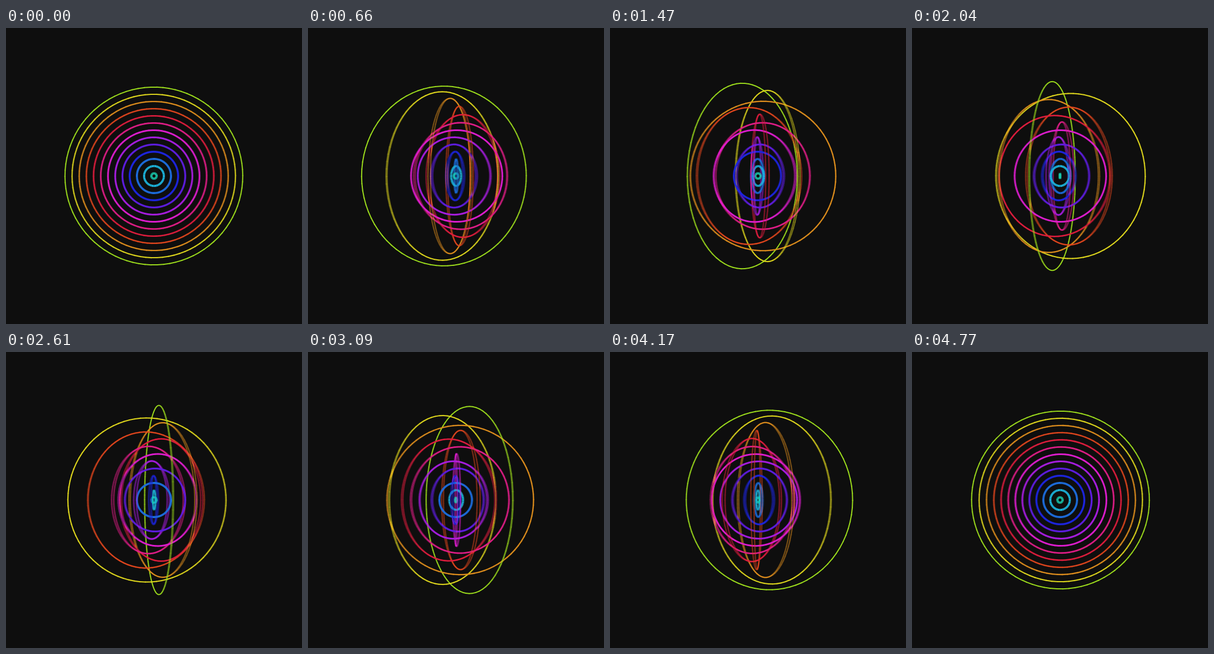
Animation of 540 by 540 pixels, one loop 4.8 s. Source, as an HTML page with a canvas:

```html
<!DOCTYPE html>
<html lang="en">
<head>
<meta charset="utf-8">
<title>Turning rings</title>
<style>
  html, body { margin: 0; width: 100%; height: 100%; overflow: hidden; background: #0e0e0e; }
  canvas { display: block; width: 540px; height: 540px; }
</style>
</head>
<body>
<canvas id="stage" width="540" height="540"></canvas>
<script>
const SIZE = 540, LOOP = 4800, STEP = 30, SHUTTER = 13.5;
const RINGS = 13, SEGMENTS = 90;
const CAMERA = SIZE / 2 / Math.tan(Math.PI / 6);

const stage = document.getElementById('stage').getContext('2d');
const layer = document.createElement('canvas');
layer.width = layer.height = SIZE;
const pen = layer.getContext('2d');

// Ring 0 is the outermost; each ring inward makes one more half turn per loop.
const rings = Array.from({ length: RINGS }, (_, i) => ({
  radius: 5 + 13.1 * (RINGS - 1 - i),
  color: `hsl(${(440 - 22.5 * i) % 360}, 77%, 49%)`,
  width: 2 + i / 6,
  halfTurns: i + 1
}));

function project(radius, turn, phi) {
  const along = radius * Math.cos(phi);
  const z = along * Math.sin(turn);
  const scale = CAMERA / (CAMERA - z);
  return {
    x: SIZE / 2 - along * Math.cos(turn) * scale,
    y: SIZE / 2 + radius * Math.sin(phi) * scale,
    z
  };
}

function drawScene(time) {
  const pieces = [];
  for (const ring of rings) {
    const turn = Math.PI * ring.halfTurns * time / LOOP;
    const at = j => project(ring.radius, turn, 2 * Math.PI * j / SEGMENTS);
    for (let j = 0; j < SEGMENTS; j++) {
      const a = at(j), b = at(j + 1.12);
      pieces.push({ a, b, ring, depth: a.z + b.z });
    }
  }
  pieces.sort((p, q) => p.depth - q.depth);

  pen.fillStyle = '#0e0e0e';
  pen.fillRect(0, 0, SIZE, SIZE);
  for (const { a, b, ring } of pieces) {
    pen.strokeStyle = ring.color;
    pen.lineWidth = ring.width;
    pen.beginPath();
    pen.moveTo(a.x, a.y);
    pen.lineTo(b.x, b.y);
    pen.stroke();
  }
}

// Motion blur: average two moments within each step.
function render(time) {
  [0, SHUTTER].forEach((offset, n) => {
    drawScene(time + offset);
    stage.globalAlpha = 1 / (n + 1);
    stage.drawImage(layer, 0, 0);
  });
}

const start = performance.now();
let shown = -1;
function tick() {
  const elapsed = (performance.now() - start) % LOOP;
  const time = Math.floor(elapsed / STEP) * STEP;
  if (time !== shown) render(shown = time);
  requestAnimationFrame(tick);
}
tick();
</script>
</body>
</html>
```
